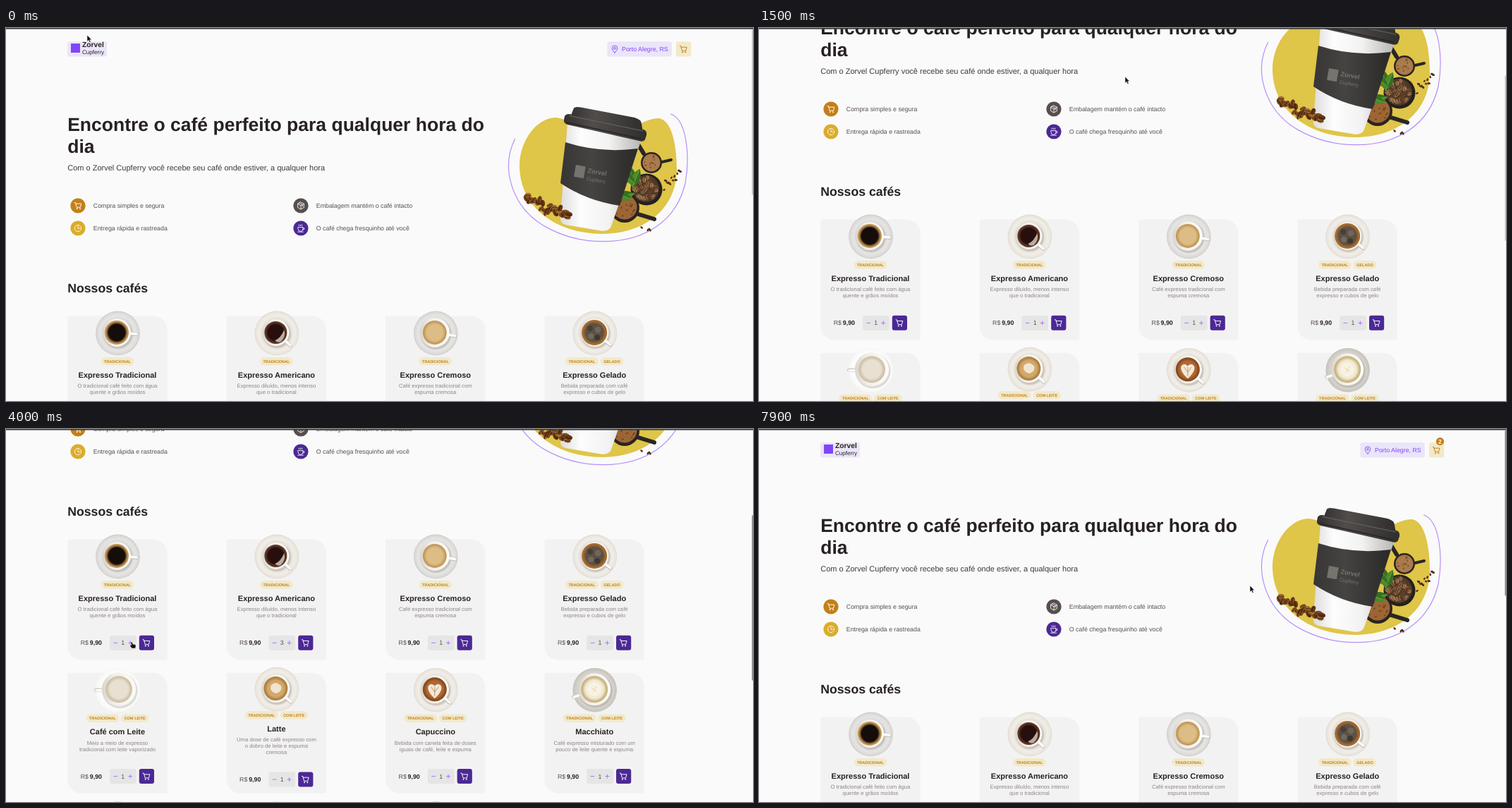
An HTML page for the animation above (8000 ms loop, 1059 by 529 pixels).

```html
<!DOCTYPE html>
<html lang="pt-BR">
<head>
<meta charset="utf-8">
<title>Cafés</title>
<style>
  html, body { margin: 0; width: 100%; height: 100%; overflow: hidden; background: #fafafa; }
  svg { display: block; width: 1059px; height: 529px; }
  text { font-family: "Liberation Sans", Arial, sans-serif; text-rendering: geometricPrecision; }
</style>
</head>
<body>
<svg id="stage" viewBox="0 0 1059 529"></svg>
<script>
const LOOP = 8000, STEP = 100;
const PURPLE = '#8047f8', DEEP = '#4b2995', GOLD = '#dbac2c', AMBER = '#c47f17';
const INK = '#272221', BODY = '#574f4d', SAND = '#f1e9c9', LILAC = '#ebe5f9';

let seed = 11;
const rnd = () => (seed = (seed * 16807) % 2147483647) / 2147483647;

const text = (x, y, size, fill, str, more = '') =>
  `<text x="${x}" y="${y}" font-size="${size}" fill="${fill}" ${more}>${str}</text>`;
const bold = 'font-weight="700" ', mid = 'text-anchor="middle"';
const box = (x, y, w, h, fill, r = 3) =>
  `<rect x="${x}" y="${y}" width="${w}" height="${h}" rx="${r}" fill="${fill}"/>`;
const dot = (x, y, r, fill, more = '') => `<circle cx="${x}" cy="${y}" r="${r}" fill="${fill}" ${more}/>`;
const path = (d, fill, more = '') => `<path d="${d}" fill="${fill}" ${more}/>`;
const line = (d, color, w = 1) =>
  path(d, 'none', `stroke="${color}" stroke-width="${w}" stroke-linecap="round" stroke-linejoin="round"`);
const at = (x, y, inner, turn = 0) => `<g transform="translate(${x} ${y}) rotate(${turn})">${inner}</g>`;

const cart = color => line('M-5,-4.5H-3.6L-1.8,2.3H3.3L4.8,-2.8H-3.1', color, .95) +
  dot(-1.3, 4.2, .95, color) + dot(3, 4.2, .95, color);

const icons = {
  cart: cart('#fff'),
  clock: line('M0,-4.6A4.6,4.6 0 1 1 -.01,-4.6M0,-2.6V.2H2.6', '#fff', .9),
  pack: line('M0,-5L4.4,-2.6V2.6L0,5L-4.4,2.6V-2.6ZM-4.4,-2.6L0,0L4.4,-2.6M0,0V5M-2.2,-3.8L2.2,-1.4V1', '#fff', .85),
  mug: line('M-4,-1.4H3V.8Q3,4 0,4.3H-1Q-4,4 -4,.8ZM3,-.8Q5.4,-.8 5,1Q4.6,2.4 2.6,2.2M-2.6,-5V-3.4M-.5,-5V-3.4M1.6,-5V-3.4M-4.4,5.2H3.4', '#fff', .85)
};

function header() {
  const pin = line('M0,5Q-3.8,1.4 -3.8,-1.2A3.8,3.8 0 0 1 3.8,-1.2Q3.8,1.4 0,5Z', PURPLE, .9) +
    `<circle cy="-1.2" r="1.4" fill="none" stroke="${PURPLE}" stroke-width=".9"/>`;
  return box(87, 19.3, 56, 21.3, LILAC) + box(92, 22, 13, 13, PURPLE, 0) +
    text(108, 27, 10.3, INK, 'Zorvel', bold) + text(108, 37, 8.1, INK, 'Cupferry') +
    box(852.3, 19.3, 91.5, 21.3, LILAC) + at(863, 30, pin) +
    text(873, 33.2, 8.83, PURPLE, 'Porto Alegre, RS') +
    box(950, 19.3, 21.3, 21.3, SAND) + at(960.3, 30, cart(AMBER)) +
    `<g id="badge">${dot(965.5, 17.6, 5.6, AMBER)}${text(965.5, 20.8, 8.6, '#fff', '2', bold + mid)}</g>`;
}

function intro() {
  const perks = [
    [102, 252, AMBER, 'cart', 'Compra simples e segura'],
    [102, 284, GOLD, 'clock', 'Entrega rápida e rastreada'],
    [418, 252, BODY, 'pack', 'Embalagem mantém o café intacto'],
    [418, 284, DEEP, 'mug', 'O café chega fresquinho até você']
  ];
  return text(87.2, 146.4, 26.53, INK, 'Encontre o café perfeito para qualquer hora do', bold) +
    text(87.2, 176.9, 26.53, INK, 'dia', bold) +
    text(87.2, 202.3, 11.03, '#403937', 'Com o Zorvel Cupferry você recebe seu café onde estiver, a qualquer hora') +
    perks.map(([x, y, c, icon, label]) =>
      dot(x, y, 10.6, c) + at(x, y, icons[icon]) + text(x + 21.8, y + 3.2, 8.83, BODY, label)).join('') +
    text(87.2, 375, 17.68, INK, 'Nossos cafés', bold);
}

const bean = (x, y, r, color) => at(x, y,
  `<ellipse rx="${r}" ry="${r * .68}" fill="${color}"/>` + line(`M${-r * .8},0Q0,${r * .4} ${r * .8},0`, '#3a1e0c', r * .22),
  rnd() * 180);

function beans(n, place, r, colors = ['#7d4a20', '#9c6632', '#643713']) {
  let out = '';
  for (let i = 0; i < n; i++) {
    const [x, y] = place(rnd(), rnd(), i / n);
    out += bean(x, y, r * (.85 + rnd() * .3), colors[i % colors.length]);
  }
  return out;
}
const within = (cx, cy, r) => (u, v) =>
  [cx + r * Math.sqrt(u) * Math.cos(v * 6.283), cy + r * Math.sqrt(u) * Math.sin(v * 6.283)];

const leaf = (x, y, len, turn) => at(x, y,
  path(`M0,0Q${len * .5},${-len * .45} ${len},0Q${len * .5},${len * .4} 0,0Z`, '#356f22') +
  path(`M0,0Q${len * .5},${-len * .45} ${len},0Z`, '#4c8a2c') +
  line(`M0,0H${len * .9}`, '#8fbb57', .5), turn);

function hero() {
  const blob = 'M728,198C727,163 750,128 779,127C800,128 812,150 830,154C872,165 893,129 925,128C944,130 951,166 951,202C950,257 905,292 845,292C780,291 730,256 728,198Z';
  const swirl = 'M721.5,157.5C701,198 717,252 760,279C790,297 820,303 848,302.7C905,302 950,275 963,220C970,180 965,130 942.5,122';
  const right =
    line('M904,178L893,160', '#2a2625', 6) +
    dot(915, 191, 15, '#2a2421') + dot(915, 191, 12.5, '#aa7a4a') +
    beans(22, within(915, 191, 10), 1.4, ['#8a5930', '#c99b68']) +
    line('M930,190L943,187', '#2a2625', 4) +
    dot(908, 229, 22.5, '#24201f') + dot(907, 228, 19, '#4f3826') +
    beans(44, within(907, 228, 16.5), 3.2, ['#8a6441', '#a98159', '#6a482c']) +
    line('M893,263L919,271', '#2a2625', 6) +
    dot(877, 255, 21, '#2a2421') + dot(877, 254, 17.5, '#9c6534') +
    beans(34, within(877, 254, 15), 1.4, ['#7d4a22', '#b98149']) +
    leaf(890, 226, 32, -102) + leaf(888, 226, 28, -68) + leaf(892, 221, 30, -138) +
    leaf(891, 235, 30, 172) + leaf(888, 243, 24, -160) +
    beans(12, (u, v, k) => [933 + k * 25, 217 - k * 20 + v * 14], 2, ['#5d3317']) +
    beans(4, (u, v) => [900 + u * 14, 278 + v * 10], 1.8, ['#5d3317']);
  const cup =
    path('M796,134L901,158L858,281Q855,289 843,287.5L793,279Q785,277 786,268Z', 'url(#paper)') +
    path('M793,162Q842,178 896,171L870,252Q823,245 786,220Z', 'url(#sleeve)') +
    path('M805,113.5Q807,111 815,112.5L891,127Q901,130 901,136L903,148L799,129Z', 'url(#lid)') +
    path('M792,125Q795,120 803,123L904,144Q909,146 908,152L906,158Q904,162 897,160L796,137Q790,135 791,130Z', 'url(#lid)') +
    line('M799,124.5L903,146', '#696562', 1) + line('M795,134L900,157', '#262423', 1.6) +
    at(808, 194, box(0, 0, 14, 17, '#77736f', 0) + text(18, 8, 9, '#77736f', 'Zorvel', bold) +
      text(18, 19, 7.2, '#77736f', 'Cupferry'), 10);
  return path(blob, '#dfc548') + line(swirl, '#b48ff9', 1.2) + right + cup +
    beans(30, (u, v, k) => [738 + k * 62, 233 + k * 29 + v * (9 + 34 * k * (1 - k))], 4.9);
}

// saucer tone, cup offset, cup radius, coffee radius, rim, coffee, handle angle, topping
const cups = [
  ['grey', -1, 20, 17, '#c0924f', '#150d0a', 5, ''],
  ['cream', -1, 19, 16, '#5e3524', '#260f0c', 42, path('M-1,11Q7,8 12,-4Q15,6 7,13Q2,15 -1,11Z', '#b9aca4')],
  ['grey', -1, 21, 17, '#c39a5c', '#dcbd85', 10, ''],
  ['cream', 0, 20, 18, '#a86a2b', '#5d5145', 38,
    dot(-6, -6, 4, '#483f36') + dot(5, -4, 4.5, '#70665a') + dot(-5, 5, 4, '#74695c') + dot(4, 7, 4, '#40382f')],
  ['white', 2, 24, 19, '#cfc2a8', '#e8e1d2', 178, ''],
  ['cream', -1, 20, 17, '#b1803f', '#d0a96c', 42, path('M-7,-4Q0,-12 8,-3Q9,5 0,7Q-9,4 -7,-4Z', '#f1e5cf')],
  ['cream', -1, 20, 17, '#8a4a1f', '#ad6a35', 42,
    path('M0,13Q-12,2 -9,-5Q-5,-10 0,-5Q5,-10 9,-5Q12,2 0,13Z', '#f4e8d6') + line('M0,-3V9M-5,-3L0,4L5,-3', '#c08d5d', .9)],
  ['tan', 0, 23, 19, '#c9b57f', '#f1ead5', 160, dot(0, 0, 10, '#f7f2e3') + line('M-4,-2L3,3M3,-4L-2,4', '#dfcd9c', .8)]
];

function drink(x, y, i) {
  const [tone, off, r, rc, , , turn, top] = cups[i];
  const handle = `<g transform="rotate(${turn})">${box(r - 3, -2.6, 14, 5.2, '#c9c5be', 2.6)}${box(r - 3, -2.2, 13, 3.6, '#fbfaf7', 1.8)}</g>`;
  return at(x, y, dot(.5, 0, 31.3, `url(#${tone})`) +
    at(off, -1, dot(1.5, 2, r + 1, '#8b847b', 'opacity=".28"') + handle +
      dot(0, 0, r, 'url(#wall)') + dot(0, 0, rc, `url(#coffee${i})`) + top));
}

const T = ['TRADICIONAL', 46.5], G = ['GELADO', 32.5], L = ['COM LEITE', 39.3];
const menu = [
  ['Expresso Tradicional', [T], ['O tradicional café feito com água', 'quente e grãos moídos']],
  ['Expresso Americano', [T], ['Expresso diluído, menos intenso', 'que o tradicional']],
  ['Expresso Cremoso', [T], ['Café expresso tradicional com', 'espuma cremosa']],
  ['Expresso Gelado', [T, G], ['Bebida preparada com café', 'expresso e cubos de gelo']],
  ['Café com Leite', [T, L], ['Meio a meio de expresso', 'tradicional com leite vaporizado']],
  ['Latte', [T, L], ['Uma dose de café expresso com', 'o dobro de leite e espuma', 'cremosa']],
  ['Capuccino', [T, L], ['Bebida com canela feita de doses', 'iguais de café, leite e espuma']],
  ['Macchiato', [T, L], ['Café expresso misturado com um', 'pouco de leite quente e espuma']]
];

function card([name, tags, desc], i) {
  const shift = desc.length > 2 ? 4.4 : 0, up = -shift, c = 70.8;
  let x = c - (tags.reduce((sum, t) => sum + t[1], 0) + 3 * (tags.length - 1)) / 2;
  let out = path('M3,0H121.5A20,20 0 0 1 141.5,20V168A3,3 0 0 1 138.5,171H20A20,20 0 0 1 0,151V3A3,3 0 0 1 3,0Z', '#f3f2f2') +
    drink(c, 24.4 - shift / 4, i);
  for (const [label, w] of tags) {
    out += box(x, 58.6 + up, w, 11.5, SAND, 5.75) + text(x + w / 2, 66.3 + up, 5.52, AMBER, label, bold + mid);
    x += w + 3;
  }
  out += text(c, 87.5 + up, 11.03, INK, name, bold + mid);
  desc.forEach((d, n) => out += text(c, 101.8 + up + n * 8.95, 7.72, '#8d8686', d, mid));
  const row = text(18.5, 3.1, 8.83, BODY, 'R$') + text(31.6, 3.1, 8.83, INK, '9,90', bold) +
    box(59.8, -10.5, 37.7, 21, '#e6e5e5') + line('M65.5,0H70.5M86.5,0H91.5M89,-2.5V2.5', '#9a6ff9', .9) +
    text(78.6, 3.1, 8.83, BODY, '1', mid + ` id="qty${i}"`) +
    box(101.6, -10.5, 21.2, 21, DEEP) + at(111.8, 0, cart('#fff'));
  return at(87.2 + 225.4 * (i % 4), i < 4 ? 408.5 : 597.8, out + at(0, 146.8 + shift, row));
}

const grad = (id, stops, kind = 'radialGradient', more = '') =>
  `<${kind} id="${id}" ${more}>${stops.map(([o, c]) => `<stop offset="${o}" stop-color="${c}"/>`).join('')}</${kind}>`;

document.getElementById('stage').innerHTML = '<defs>' +
  grad('grey', [[.5, '#cfcdcc'], [.8, '#e6e5e4'], [.95, '#dad9d8'], [1, '#c9c8c7']]) +
  grad('cream', [[.5, '#d8d2c7'], [.8, '#f1eee8'], [.95, '#e9e5dd'], [1, '#dcd7cd']]) +
  grad('white', [[.5, '#ececea'], [.8, '#fcfcfb'], [1, '#f7f7f6']]) +
  grad('tan', [[.5, '#b9b5ae'], [.8, '#d6d3cd'], [1, '#c6c2bb']]) +
  grad('wall', [[0, '#d9d5ce'], [.35, '#f1eeea'], [1, '#fdfcfa']], 'linearGradient') +
  cups.map((c, i) => grad('coffee' + i, [[.68, c[5]], [.9, c[4]], [1, c[4]]])).join('') +
  grad('paper', [[0, '#dcdcdc'], [.25, '#fdfdfd'], [.6, '#f2f2f2'], [1, '#b7b5b3']], 'linearGradient') +
  grad('sleeve', [[0, '#383635'], [.4, '#464443'], [1, '#2b2928']], 'linearGradient') +
  grad('lid', [[0, '#33302f'], [.35, '#504d4b'], [1, '#302e2d']], 'linearGradient') +
  '</defs>' + box(0, 0, 1059, 529, '#fafafa', 0) +
  `<g id="page">${header()}${intro()}${hero()}${menu.map(card).join('')}` +
  [0, 1, 2].map(i => drink(158 + 225.4 * i, 811.5, i)).join('') + '</g>' +
  '<rect id="thumb" x="1057.5" width="1.5" height="234"/>' + box(0, 0, 1059, 1.6, '#3a3d3e', 0) +
  `<g id="arrow">${path('M0,0V9.2L2.1,7.3L3.6,10.6L5.2,9.9L3.7,6.7H6.4Z', '#111', 'stroke="#fff" stroke-width=".5"')}</g>` +
  `<g id="hand">${path('M-1,.6Q0,-.6 1,.6L1.6,3L5,3.7Q6.3,4.2 6,6L5.4,9H.4L-2.3,5.7Q-2.3,4.4 -.4,4.8Z', '#111', 'stroke="#fff" stroke-width=".4"')}</g>`;

// keyframes: time, then values
const pointer = [
  [100, 115, 10], [300, 85, 17], [500, 85, 17], [1000, 519, 69], [1800, 519, 69], [2300, 401, 296],
  [2800, 401, 296], [2900, 402, 304.5], [3300, 402, 304.5], [3700, 290, 313], [4000, 178, 302],
  [4100, 178, 302], [4300, 177, 301], [4700, 177, 301], [5200, 224, 317], [5600, 206, 303],
  [5700, 207, 303], [6300, 207, 303], [6400, 242, 306], [6750, 340, 319], [7100, 428, 304],
  [7500, 428, 304], [7900, 696, 222]
];
const scroll = [[900, 0], [1200, 95], [1300, 112], [1400, 112], [1500, 137], [2000, 252], [7500, 252], [7900, 0]];
const hovers = [[2900, 3300], [4000, 4700], [5500, 6300], [7000, 7500]];

function sample(keys, t) {
  const n = keys.findIndex(k => k[0] >= t);
  if (n < 0) return keys[keys.length - 1].slice(1);
  if (n === 0) return keys[0].slice(1);
  const a = keys[n - 1], b = keys[n], u = (t - a[0]) / (b[0] - a[0]);
  return a.slice(1).map((v, i) => v + (b[i + 1] - v) * u);
}

const el = id => document.getElementById(id);
const show = (id, on) => el(id).setAttribute('visibility', on ? 'visible' : 'hidden');
const count = (t, second, third) => t >= third ? 3 : t >= second ? 2 : 1;

function draw(time) {
  const t = Math.floor(time % LOOP / STEP) * STEP;
  const [y] = sample(scroll, t), [px, py] = sample(pointer, t);
  const hand = hovers.some(([a, b]) => t >= a && t <= b);
  el('page').setAttribute('transform', `translate(0 ${-y})`);
  el('thumb').setAttribute('y', 2.3 + y * .477);
  el('thumb').setAttribute('fill', t < 2000 ? '#c1c1c1' : '#808080');
  el('qty0').textContent = count(t, 4200, 4600);
  el('qty1').textContent = count(t, 2900, 3100);
  show('badge', t >= 7200);
  show('hand', hand);
  show('arrow', !hand);
  el(hand ? 'hand' : 'arrow').setAttribute('transform', `translate(${px} ${py})`);
}

const start = performance.now();
function tick() {
  draw(performance.now() - start);
  requestAnimationFrame(tick);
}
tick();
</script>
</body>
</html>
```
